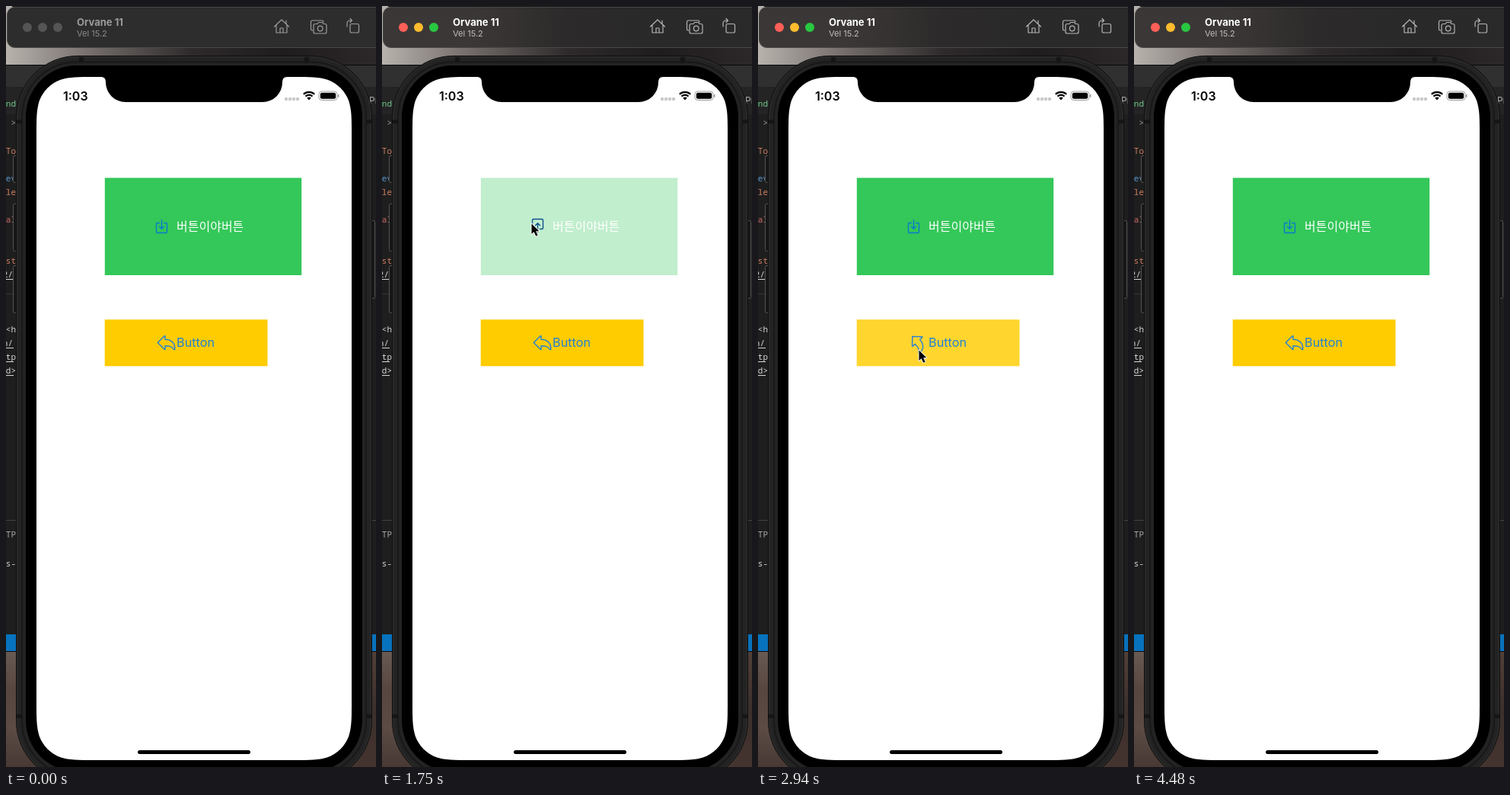
An HTML page with a canvas for the animation above (5040 ms loop, 486 px wide and 998 px high).

```html
<!DOCTYPE html>
<html lang="ko">
<head>
<meta charset="utf-8">
<style>
html, body { margin: 0; width: 100%; height: 100%; overflow: hidden; background: #1e1e1e; }
canvas { display: block; width: 486px; height: 998px; }
</style>
</head>
<body>
<canvas id="stage" width="486" height="998"></canvas>
<script>
const ctx = document.getElementById('stage').getContext('2d');
const LOOP = 5040, STEP = 70;
const SANS = 'Inter, sans-serif';
const HANGUL = '"Noto Sans CJK KR", "Noto Sans CJK", sans-serif';
const CODE = '"Noto Sans Mono", monospace';

const CURSOR_PATH = [
  [70, 262, 940], [280, 235, 600], [420, 205, 400], [560, 192, 305], [630, 190, 302],
  [700, 190, 302], [840, 196, 285], [2030, 196, 285], [2100, 204.5, 310], [2240, 209, 385],
  [2380, 211, 449], [2450, 211, 451], [4200, 211, 451], [4270, 214, 480], [4340, 230, 640],
  [4410, 260, 938]
];

function rect(x, y, w, h, color) {
  ctx.fillStyle = color;
  ctx.fillRect(x, y, w, h);
}

function rounded(x, y, w, h, r, fill, stroke, lineWidth = 1) {
  ctx.beginPath();
  ctx.roundRect(x, y, w, h, r);
  if (fill) { ctx.fillStyle = fill; ctx.fill(); }
  if (stroke) { ctx.strokeStyle = stroke; ctx.lineWidth = lineWidth; ctx.stroke(); }
}

// Rounded rectangle whose corners ease into the straight edges.
function smoothRect(x, y, w, h, r, fill) {
  ctx.fillStyle = fill;
  ctx.beginPath();
  for (const [cx, cy, sx, sy] of [[x, y, 1, 1], [x + w, y, -1, 1], [x + w, y + h, -1, -1], [x, y + h, 1, -1]]) {
    const corner = [[0, 1.528], [0, 1.088], [0, 0.868], [0.075, 0.631], [0.169, 0.373],
      [0.373, 0.169], [0.631, 0.075], [0.868, 0], [1.088, 0], [1.528, 0]]
      .map(([u, v]) => [cx + sx * u * r, cy + sy * v * r]);
    if (sx !== sy) corner.reverse();
    ctx.lineTo(...corner[0]);
    for (let i = 1; i < 10; i += 3) ctx.bezierCurveTo(...corner[i], ...corner[i + 1], ...corner[i + 2]);
  }
  ctx.fill();
}

function circle(x, y, r, color) {
  ctx.fillStyle = color;
  ctx.beginPath();
  ctx.arc(x, y, r, 0, Math.PI * 2);
  ctx.fill();
}

function text(str, x, y, font, color, align = 'left') {
  ctx.font = font;
  ctx.fillStyle = color;
  ctx.textAlign = align;
  ctx.fillText(str, x, y);
}

function strokePath(d, color, width) {
  ctx.strokeStyle = color;
  ctx.lineWidth = width;
  ctx.lineJoin = ctx.lineCap = 'round';
  ctx.stroke(new Path2D(d));
}

function gradient(x0, y0, x1, y1, ...colors) {
  const g = ctx.createLinearGradient(x0, y0, x1, y1);
  colors.forEach((c, i) => g.addColorStop(i / (colors.length - 1), c));
  return g;
}

function drawDesktop() {
  rect(0, 0, 486, 78, gradient(0, 0, 486, 0, '#b8b2ad', '#6f6866', '#2e2a2b', '#201d1e', '#2c2728'));
  rect(0, 846, 243, 152, gradient(0, 846, 0, 998, '#6a5a54', '#574640', '#5c4b45', '#483934'));
  rect(243, 846, 243, 152, gradient(0, 846, 0, 998, '#523f38', '#3c2f2b', '#44342f'));
}

function drawEditor() {
  rect(0, 77, 486, 770, '#1e1e1e');
  rect(0, 77, 486, 1, '#090909');
  rect(0, 78, 486, 28, '#303030');
  rect(0, 106, 486, 36, '#242424');
  rect(0, 674, 486, 1, '#444');
  rect(0, 377, 14, 1, '#333');
  rect(0, 824, 486, 22, '#0872bd');
  rect(0, 846, 486, 1, '#0a0a0a');
  const lines = [
    ['nd', 128, '#73c991'], ['o >', 153, '#a0a0a0'], ['To', 190, '#ce7d62'],
    ['lev', 226, '#569cd6'], ['ble', 244, '#ce7d62'], ['al', 280, '#d16969'],
    ['ist', 334, '#ce7d62'], ['2/', 352, '#d4d4d4', 1], ['<h', 424, '#d4d4d4'],
    ['in/', 442, '#d4d4d4', 1], ['ttp', 460, '#d4d4d4', 1], ['rd>', 478, '#d4d4d4', 1],
    ['TP', 693, '#a8a8a8'], ['es-', 731, '#d4d4d4']
  ];
  for (const [str, y, color, underlined] of lines) {
    text(str, str.endsWith('/') ? 9 : 13, y + 4, '11px ' + CODE, color, 'right');
    if (underlined) rect(0, y + 6, 10, 1, color);
  }
  text('Pr', 477, 128, '12px ' + SANS, '#a8a8a8');
}

function drawTitleBar(active) {
  const tint = active
    ? gradient(0, 0, 486, 0, '#3a3736', '#3b3736', '#2c2a2a', '#2a2929', '#2b2a2a')
    : '#2d2d2d';
  rounded(1.5, 1.5, 520, 53, 10, tint, '#484848');
  rect(8, 0, 478, 1, '#111');
  const lights = active ? ['#ff5f57', '#febc2e', '#28c840'] : ['#555', '#555', '#555'];
  lights.forEach((c, i) => circle(28 + i * 20, 28, 6, c));
  text('Orvane 11', 93, 26, 'bold 13px ' + SANS, active ? '#fff' : '#9b9b9b');
  text('Vel 15.2', 93, 40, '11px ' + SANS, active ? '#bdbdbd' : '#8c8c8c');

  const color = active ? '#b4b4b4' : '#9c9c9c';
  strokePath('M352.5 27 L362 18 L371.5 27 M355 25 V35 H369 V25 M360 35 V29 H364 V35 M368 19 V23', color, 1.2);
  strokePath('M403 32 H402 Q400.500 32 400.500 30 V21 Q400.500 19 402.500 19 H415 Q417 19 417 21', color, 1.2);
  strokePath('M406 23.500 H409 L410.500 21.500 H415.500 L417 23.500 H419 Q421 23.500 421 25.500 V34 Q421 36 419 36 H406 Q404 36 404 34 V25.500 Q404 23.500 406 23.500 Z M416 29.500 A3.300 3.300 0 1 1 409.400 29.500 A3.300 3.300 0 1 1 416 29.500', color, 1.2);
  strokePath('M454 23.500 H461.500 Q463.500 23.500 463.500 25.500 V33 Q463.500 35 461.500 35 H454 Q452 35 452 33 V25.500 Q452 23.500 454 23.500 Z M448 27 V23 Q448 19 452 19 H454 M452 16.500 L454.500 19 L452 21.500', color, 1.2);
}

function drawPhone() {
  for (const [y, h] of [[196, 35], [259, 62], [340, 62]]) rounded(9.5, y + 0.5, 6, h, 2, '#171717', '#555');
  rounded(478.5, 281.5, 6, 102, 2, '#171717', '#555');
  rounded(13.5, 65.5, 467, 952, 80, '#232323', '#0f0f0f');
  rounded(15, 67, 464, 949, 78, null, '#303030');
  rounded(21, 73.5, 452, 936, 72, null, '#191919', 2);
  for (const x of [96, 392]) rect(x, 67, 6, 6, '#151515');
  for (const x of [14, 473]) {
    rect(x, 149, 7, 5, '#151515');
    rect(x, 929, 7, 5, '#151515');
  }
  rounded(26, 78, 442, 926, 67, '#000');
  smoothRect(40, 93, 414, 896, 50, '#fff');
  ctx.fillStyle = '#000';
  ctx.fill(new Path2D('M125 92 V93 Q131 93 131 100 A26 26 0 0 0 157 126 H337 A26 26 0 0 0 363 100 Q363 93 369 93 V92 Z'));
  rounded(173, 976, 148, 5, 2.5, '#000');
}

function drawStatus() {
  text('1:03', 75, 124, '600 16px ' + SANS, '#000');
  for (let i = 0; i < 4; i++) rounded(366 + i * 5, 120, 4, 4, 1, '#c9c9c9');
  ctx.lineCap = 'butt';
  ctx.strokeStyle = '#000';
  ctx.lineWidth = 2.2;
  for (const r of [10.2, 6.4]) {
    ctx.beginPath();
    ctx.arc(398, 123, r, -Math.PI * 0.75, -Math.PI * 0.25);
    ctx.stroke();
  }
  ctx.fillStyle = '#000';
  ctx.fill(new Path2D('M398 123.500 L395.200 120.600 Q398 118.200 400.800 120.600 Z'));
  rounded(411, 112, 24, 11.5, 3.5, null, '#9c9c9c');
  rounded(412.8, 113.8, 20.4, 8, 2, '#000');
  rounded(436, 115.8, 1.5, 4, 1, '#9c9c9c');
}

function drawIcon(x, y, angle, path, color) {
  ctx.save();
  ctx.translate(x, y);
  ctx.rotate(angle * Math.PI / 180);
  strokePath(path, color, 1.4);
  ctx.restore();
}

// Opacity falls to 0.3 over the first half turn and returns over the second.
const opacity = turn => 1 - 0.7 * (1 - Math.abs(1 - turn));

function drawGreenButton(turn, pressed) {
  rect(129.8, 225.4, 258.4, 127.6, `rgba(52,199,89,${opacity(turn)})`);
  const down = 'M-3 -4 H-5.500 Q-7 -4 -7 -2.500 V7.500 Q-7 9 -5.500 9 H5.500 Q7 9 7 7.500 V-2.500 Q7 -4 5.500 -4 H3 M0 -8 V3.500 M-3 0.800 L0 3.800 L3 0.800';
  drawIcon(204.5, 288.5, turn * 180, down, pressed ? '#0d4f8f' : '#0a7ad0');
  text('버튼이야버튼', 224, 294.5, '16px ' + HANGUL, '#fff');
}

function drawYellowButton(turn, pressed) {
  rect(129.7, 411.2, 213.8, 61.1, `rgba(255,204,0,${opacity(turn)})`);
  const reply = 'M-11.200 0 L-2.300 -8.800 Q-1.500 -9.300 -1.500 -8.300 V-4.300 C7 -4.300 11.500 1 11.300 8.600 Q11 9.800 10.200 8.800 C7.500 5 4.500 4.300 -1.500 4.300 V8.300 Q-1.500 9.300 -2.300 8.800 Z';
  drawIcon(210.5, 441.5, turn * 180, reply, pressed ? '#245f98' : '#2380d6');
  text('Button', 224, 447, '16.3px ' + SANS, pressed ? 'rgba(35,128,214,.35)' : '#2380d6');
}

function drawCursor(t) {
  const next = CURSOR_PATH.findIndex(p => p[0] >= t);
  if (t < CURSOR_PATH[0][0] || next < 0) return;
  const b = CURSOR_PATH[next], a = CURSOR_PATH[Math.max(0, next - 1)];
  const k = b === a ? 0 : (t - a[0]) / (b[0] - a[0]);
  ctx.save();
  ctx.translate(a[1] + (b[1] - a[1]) * k, a[2] + (b[2] - a[2]) * k);
  const arrow = new Path2D('M0.500 0.500 V14 L3.600 11.200 L6.200 16.800 L8.700 15.700 L6.200 10.300 H10.300 Z');
  ctx.lineJoin = 'round';
  ctx.strokeStyle = '#fff';
  ctx.lineWidth = 1.8;
  ctx.stroke(arrow);
  ctx.fillStyle = '#000';
  ctx.fill(arrow);
  ctx.restore();
}

function ease(t, start, duration) {
  const x = Math.min(1, Math.max(0, (t - start) / duration));
  return x * x * (3 - 2 * x);
}

const within = (t, start, end) => t >= start && t < end;

function render(t) {
  ctx.clearRect(0, 0, 486, 998);
  drawDesktop();
  drawEditor();
  drawTitleBar(t >= 770);
  drawPhone();
  drawStatus();
  // Each tap adds a half turn; the second one restores the fill.
  drawGreenButton(ease(t, 905, 300) + ease(t, 1890, 210), within(t, 840, 910) || within(t, 1750, 1890));
  drawYellowButton(ease(t, 2870, 210) + ease(t, 3710, 280), within(t, 2730, 2870) || within(t, 3570, 3710));
  drawCursor(t);
}

function tick() {
  const t = performance.now() % LOOP;
  render(Math.floor(t / STEP) * STEP);
  requestAnimationFrame(tick);
}
tick();
</script>
</body>
</html>
```
